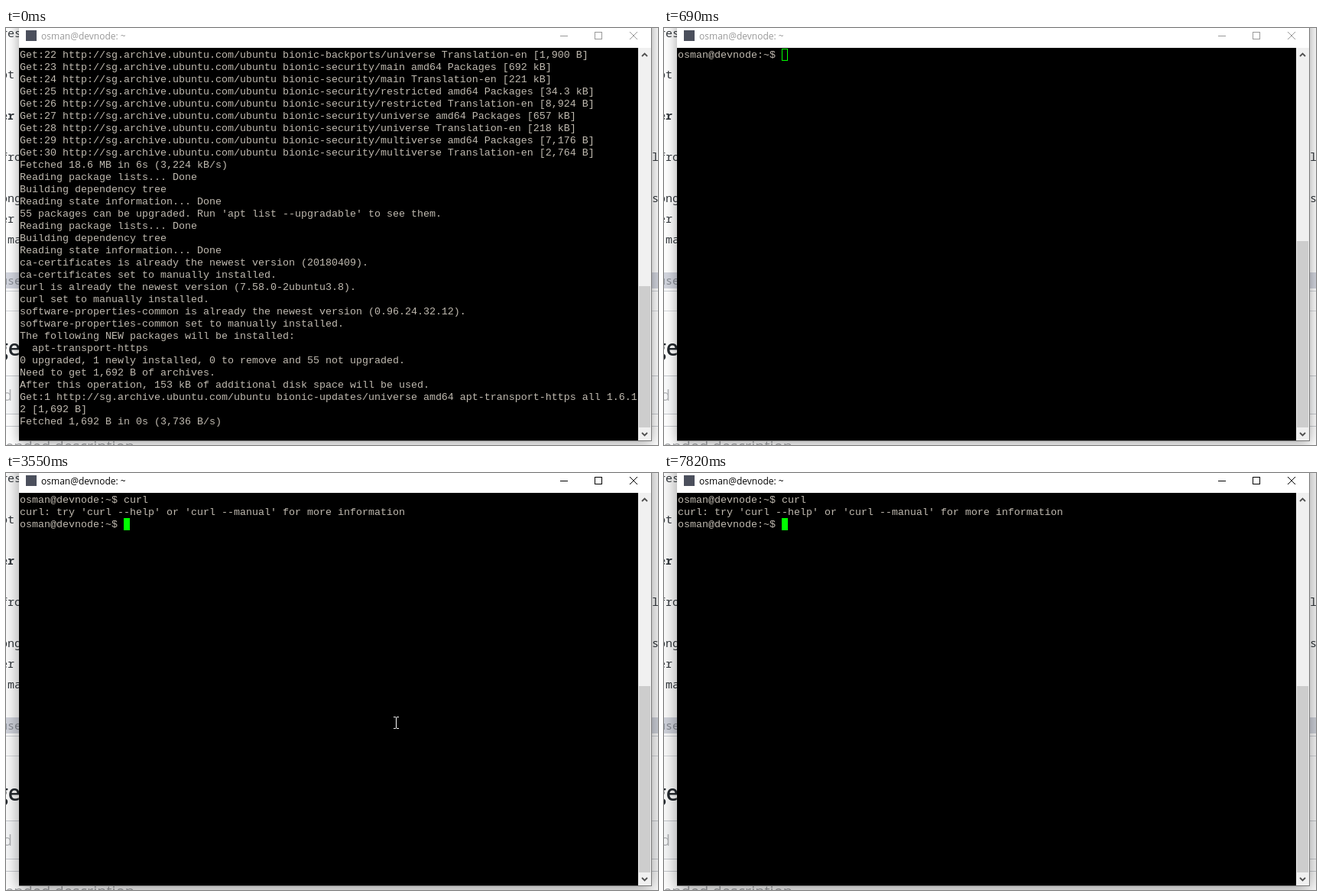
Write an HTML page with a canvas that moves like this. It is 853 px wide and 546 px high and loops after 8000 ms.

```html
<!DOCTYPE html>
<html lang="en">
<head>
<meta charset="utf-8">
<title>Terminal session</title>
<style>
  html, body { margin: 0; width: 100%; height: 100%; overflow: hidden; background: #fff; }
  canvas { display: block; }
</style>
</head>
<body>
<canvas id="stage" width="853" height="546"></canvas>
<script>
const ctx = document.getElementById('stage').getContext('2d');
const LOOP = 8000, COL = 8, ROW = 16, LEFT = 18, TOP = 27;
const MONO = '13.333px "Liberation Mono", monospace';
const INK = '#c0bab0';
const HOST = 'osman@devnode';
const PROMPT = HOST + ':~$ ';

const mirror = 'http://sg.archive.ubuntu.com/ubuntu bionic-';
const fetched = [
  'backports/universe Translation-en [1,900 B]',
  'security/main amd64 Packages [692 kB]',
  'security/main Translation-en [221 kB]',
  'security/restricted amd64 Packages [34.3 kB]',
  'security/restricted Translation-en [8,924 B]',
  'security/universe amd64 Packages [657 kB]',
  'security/universe Translation-en [218 kB]',
  'security/multiverse amd64 Packages [7,176 B]',
  'security/multiverse Translation-en [2,764 B]'
].map((item, i) => `Get:${22 + i} ${mirror}${item}`);
const reading = [
  'Reading package lists... Done',
  'Building dependency tree',
  'Reading state information... Done'
];
const log = [
  ...fetched,
  'Fetched 18.6 MB in 6s (3,224 kB/s)',
  ...reading,
  "55 packages can be upgraded. Run 'apt list --upgradable' to see them.",
  ...reading,
  'ca-certificates is already the newest version (20180409).',
  'ca-certificates set to manually installed.',
  'curl is already the newest version (7.58.0-2ubuntu3.8).',
  'curl set to manually installed.',
  'software-properties-common is already the newest version (0.96.24.32.12).',
  'software-properties-common set to manually installed.',
  'The following NEW packages will be installed:',
  '  apt-transport-https',
  '0 upgraded, 1 newly installed, 0 to remove and 55 not upgraded.',
  'Need to get 1,692 B of archives.',
  'After this operation, 153 kB of additional disk space will be used.',
  `Get:1 ${mirror}updates/universe amd64 apt-transport-https all 1.6.1`,
  '2 [1,692 B]',
  'Fetched 1,692 B in 0s (3,736 B/s)'
];
const install = [
  'Selecting previously unselected package apt-transport-https.',
  '(Reading database ... 67005 files and directories currently installed.)',
  'Preparing to unpack .../apt-transport-https_1.6.12_all.deb ...',
  'Unpacking apt-transport-https (1.6.12) ...',
  'Setting up apt-transport-https (1.6.12) ...'
];

// [start, install lines shown, progress percent]
const installSteps = [[140, 0, 0], [220, 2, 0], [290, 3, 0], [370, 4, 17], [450, 5, 67], [520, 5, null]];
const keyTimes = [2160, 2310, 2390, 2540, 2620];
// [start, x, y of the pointer]; no position means hidden
const pointerSteps = [
  [0], [1240, 561, 387], [1310, 510, 327],
  [4560, 462, 294], [4640, 330, 200], [4710, 150, 82], [4790, 42, 2], [4870],
  [7440, 349, 124], [7510, 411, 101], [7740, 600, 2], [7820]
];

const latest = (steps, t) => steps.filter(step => step[0] <= t).pop();

function rect(x, y, w, h, color) {
  ctx.fillStyle = color;
  ctx.fillRect(x, y, w, h);
}

function text(str, x, y, font, color) {
  ctx.font = font;
  ctx.fillStyle = color;
  ctx.fillText(str, x, y);
}

function line(color, width, ...points) {
  ctx.strokeStyle = color;
  ctx.lineWidth = width;
  ctx.beginPath();
  points.forEach(([x, y]) => ctx.lineTo(x, y));
  ctx.stroke();
}

function print(str, row, col = 0, color = INK) {
  text(str, LEFT + col * COL, TOP + row * ROW + 12, MONO, color);
}

function drawPage() {
  rect(0, 0, 853, 546, '#fff');
  rect(0, 320, 853, 21, '#d3d6df');
  const code = '15px "Noto Sans Mono", monospace';
  [['res', 12], ['ot', 66], ['er', 120, 'bold '], ['fro', 174], ['ong', 228],
   ['er', 255], [' ma', 282], ['use', 336, '', '#888c94']
  ].forEach(([str, y, weight = '', color = '#33383d']) => text(str, -7, y, weight + code, color));
  text('l', 845, 174, code, '#33383d');
  text('s', 845, 228, code, '#33383d');

  rect(0, 344, 853, 1, '#d0d3d8');
  rect(0, 370, 853, 1, '#d8dade');
  rect(0, 455, 853, 51, '#fafbfc');
  [455, 505, 521].forEach(y => rect(0, y, 853, 1, '#c8cbd0'));
  const sans = '"Open Sans", sans-serif';
  ctx.textAlign = 'right';
  text('ge', 19, 429, '600 28px ' + sans, '#24292e');
  text('d', 8, 488, '20px ' + sans, '#b4b6b9');
  text('extended description', 168, 555, '20px ' + sans, '#a4a6a9');
  ctx.textAlign = 'left';
}

function drawWindow(focused, totalRows) {
  ctx.save();
  ctx.shadowColor = focused ? 'rgba(0,0,0,.42)' : 'rgba(0,0,0,.38)';
  ctx.shadowBlur = focused ? 22 : 16;
  ctx.shadowOffsetY = focused ? 4 : 2;
  rect(17, -20, 828, 561, '#777');
  ctx.restore();

  rect(17, 0, 827, 26, '#fff');
  rect(17, 26, 810, 514, '#000');
  rect(26, 3, 14, 14, '#4b4f5c');
  const ink = focused ? '#000' : '#999';
  text(HOST + ': ~', 46, 15, '12px "Open Sans", sans-serif', ink);
  line(ink, 1, [725, 10.5], [735, 10.5]);
  ctx.strokeRect(770.5, 5.5, 9, 9);
  line(ink, 1, [816, 5], [826, 15]);
  line(ink, 1, [826, 5], [816, 15]);

  rect(827, 26, 17, 514, '#f0f0f0');
  const thumb = Math.round(480 * 32 / totalRows);
  rect(828, 523 - thumb, 15, thumb, '#cdcdcd');
  line('#505050', 1.8, [832, 37], [835.5, 33.5], [839, 37]);
  line('#505050', 1.8, [832, 530], [835.5, 533.5], [839, 530]);
}

function drawCaret(row, col, focused) {
  const x = LEFT + col * COL, y = TOP + row * ROW;
  if (focused) return rect(x, y, COL, ROW, '#0f0');
  ctx.strokeStyle = '#0f0';
  ctx.lineWidth = 1;
  ctx.strokeRect(x + .5, y + .5, COL - 1, ROW - 1);
}

function drawProgress(percent) {
  rect(LEFT, TOP + 31 * ROW, 16 * COL, ROW, '#0b0');
  print(`Progress: [${String(percent).padStart(3)}%]`, 31, 0, '#000');
  const done = Math.floor(79 * percent / 100);
  print('[', 31, 17);
  print('#'.repeat(done), 31, 18, '#a8d0f0');
  print('.'.repeat(79 - done) + ']', 31, 18 + done);
}

function drawInstall(t) {
  const step = latest(installSteps, t);
  const [, shown, percent] = step || [0, 0, null];
  const scroll = step ? shown + 1 : 0;
  drawWindow(false, 83 + scroll);
  const lines = [...log, ...install.slice(0, shown)].slice(scroll);
  lines.forEach((str, row) => print(str, row));
  if (!step) return;
  const finished = percent === null;
  if (finished) print(PROMPT, lines.length);
  else drawProgress(percent);
  drawCaret(lines.length, finished ? PROMPT.length : 0, false);
}

function drawShell(t) {
  const focused = t >= 1470;
  drawWindow(focused, 63);
  const typed = 'curl '.slice(0, keyTimes.filter(time => time <= t).length);
  print(PROMPT + typed, 0);
  if (t >= 3400) {
    print("curl: try 'curl --help' or 'curl --manual' for more information", 1);
    print(PROMPT, 2);
    drawCaret(2, PROMPT.length, focused);
  } else {
    drawCaret(0, PROMPT.length + typed.length, focused);
  }
  if (t >= 1470 && t < 1700) rect(LEFT, 315, 808, ROW, '#bbb');
}

function drawPointer(t) {
  const clicking = (t >= 1470 && t < 1540) || (t >= 3400 && t < 3550);
  if (clicking) {
    ctx.fillStyle = 'rgba(255,255,0,.5)';
    ctx.beginPath();
    ctx.arc(508, 326, 12, 0, 7);
    ctx.fill();
  }
  const [, x, y] = latest(pointerSteps, t);
  if (x === undefined) return;
  if (y < 27) {
    const arrow = new Path2D(`M${x} ${y}v16l4-4 3 7 2-1-3-7h6z`);
    ctx.fillStyle = '#fff';
    ctx.fill(arrow);
    ctx.strokeStyle = '#000';
    ctx.lineWidth = 1;
    ctx.stroke(arrow);
    return;
  }
  ctx.globalCompositeOperation = 'difference';
  rect(x, y - 7, 1, 14, '#fff');
  [y - 8, y + 7].forEach(capY => {
    rect(x - 3, capY, 3, 1, '#fff');
    rect(x + 1, capY, 3, 1, '#fff');
  });
  ctx.globalCompositeOperation = 'source-over';
}

function draw(now) {
  const t = now % LOOP;
  drawPage();
  (t < 690 ? drawInstall : drawShell)(t);
  drawPointer(t);
}

const start = performance.now();
function tick() {
  draw(performance.now() - start);
  requestAnimationFrame(tick);
}
tick();
</script>
</body>
</html>
```
